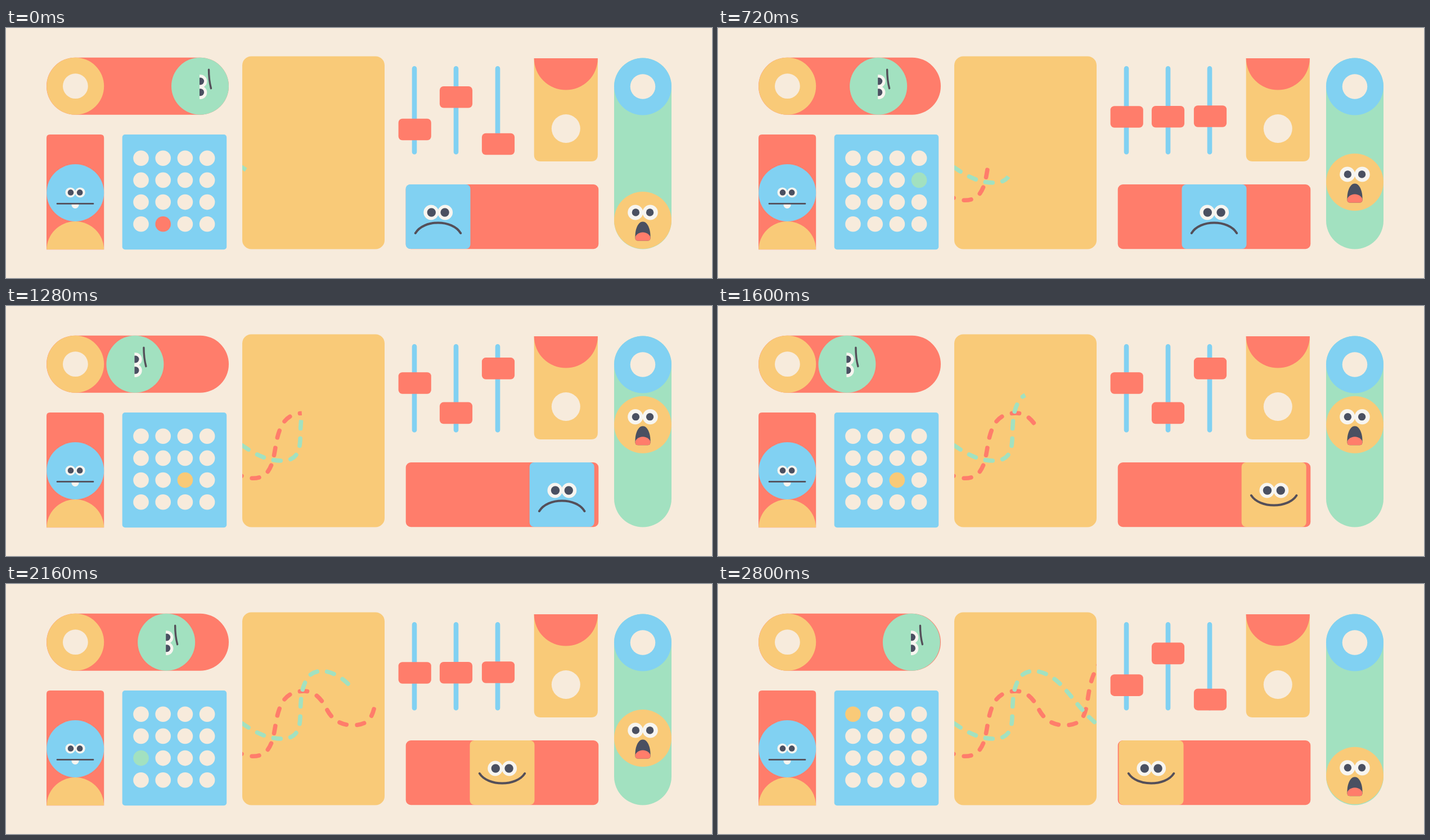
Write an HTML page that moves like this. It is 1255 px wide and 446 px high and loops after 2880 ms.

```html
<!DOCTYPE html>
<html lang="en">
<head>
<meta charset="utf-8">
<title>Toy shapes</title>
<style>
  html, body { margin: 0; width: 100%; height: 100%; overflow: hidden; background: #f7ebdc; }
  svg { display: block; width: 1255px; height: 446px; }
  .bg { fill: #f7ebdc; }
  .coral { fill: #ff7d6b; }
  .gold { fill: #f9ca78; }
  .blue { fill: #81d1f2; }
  .mint { fill: #a2e1c0; }
  .white { fill: #f7f5f0; }
  .dark { fill: #4a5061; }
  .line { fill: none; stroke: #544f59; stroke-linecap: round; }
  .track { stroke: #81d1f2; stroke-width: 8.6; stroke-linecap: round; }
  .dash { fill: none; stroke-width: 7.6; stroke-linecap: round; }
  .reveal { fill: none; stroke: #fff; stroke-width: 20; }
</style>
</head>
<body>
<svg viewBox="0 0 1255 446">
  <defs>
    <path id="mintPath" d="M410,242 C430,255 455,276 490,276 C515,276 522,262 523,238 C524,205 524,180 541,162 C556,150 580,155 600,171 C622,188 645,228 674,250 l10,7"/>
    <path id="coralPath" d="M410,299 C428,309 452,312 465,296 C481,275 476,239 490,214 C498,197 513,191 530,191 C548,191 560,204 569,221 C579,242 594,252 618,252 C640,251 650,243 655,219 C660,190 661,172 674,148 l6,-10"/>
    <mask id="mintMask" maskUnits="userSpaceOnUse" x="400" y="40" width="290" height="360">
      <use id="mintReveal" class="reveal" href="#mintPath"/>
    </mask>
    <mask id="coralMask" maskUnits="userSpaceOnUse" x="400" y="40" width="290" height="360">
      <use id="coralReveal" class="reveal" href="#coralPath"/>
    </mask>
    <clipPath id="card"><rect x="420" y="50.5" width="253" height="344" rx="16"/></clipPath>
    <clipPath id="lid"><rect x="-1" y="-30" width="30" height="60"/></clipPath>
    <clipPath id="tall"><rect x="72" y="190" width="102" height="205"/></clipPath>
    <path id="mouth" d="M-13.5,28 C-13.5,16 -8.5,2.5 0,2.5 C8.5,2.5 13.5,16 13.5,28 V31.5 q0,5 -5,5 h-17 q-5,0 -5,-5z"/>
    <clipPath id="mouthClip"><use href="#mouth"/></clipPath>
    <g id="squareEyes">
      <circle class="white" cx="45.2" cy="50" r="13.4"/><circle class="white" cx="70.2" cy="50" r="13.4"/>
      <circle class="dark" cx="45.8" cy="50" r="7.7"/><circle class="dark" cx="69.6" cy="50" r="7.7"/>
    </g>
  </defs>

  <!-- Horizontal pill -->
  <rect class="coral" x="72" y="52.7" width="324" height="102" rx="51"/>
  <circle class="gold" cx="123.2" cy="103.7" r="51"/>
  <circle class="bg" cx="123.4" cy="103.7" r="22.4"/>
  <g id="mintBall">
    <circle class="mint" r="51"/>
    <g clip-path="url(#lid)">
      <circle class="white" cx=".5" cy="-8.7" r="11.8"/><circle class="white" cx=".5" cy="11.4" r="11.8"/>
      <circle class="dark" cx=".6" cy="-8.7" r="6.5"/><circle class="dark" cx=".6" cy="11" r="6.5"/>
    </g>
    <path class="line" stroke-width="3.4" d="M15.5,-29.5 Q15.5,-11 19.5,4"/>
  </g>

  <!-- Tall box -->
  <path class="coral" d="M72,395.3 V196 q0,-6 6,-6 h90.2 q6,0 6,6 V395.3z"/>
  <circle class="blue" cx="123.2" cy="294" r="51"/>
  <circle class="gold" cx="123.2" cy="396" r="51" clip-path="url(#tall)"/>
  <circle class="white" cx="114.5" cy="293.4" r="9"/><circle class="white" cx="131.7" cy="293.4" r="9"/>
  <circle class="dark" cx="115" cy="293.4" r="5.3"/><circle class="dark" cx="131.2" cy="293.4" r="5.3"/>
  <path class="white" d="M116.5,314 h13 v1.5 a6.5,6.5 0 0 1 -13,0z"/>
  <path class="line" stroke-width="2.6" d="M91,313.4 H155"/>

  <!-- Dot board -->
  <rect class="blue" x="206.7" y="190" width="185.5" height="205.3" rx="5"/>
  <g id="dots"></g>

  <!-- Dashed lines -->
  <rect class="gold" x="420" y="50.5" width="253" height="344" rx="16"/>
  <g clip-path="url(#card)">
    <g mask="url(#coralMask)">
      <use class="dash" href="#coralPath" stroke="#ff7d6b" stroke-dasharray="13 18.8" stroke-dashoffset="-28.5"/>
    </g>
    <g mask="url(#mintMask)">
      <use class="dash" href="#mintPath" stroke="#a2e1c0" stroke-dasharray="13 17.6" stroke-dashoffset="-12.5"/>
    </g>
  </g>

  <!-- Sliders -->
  <path class="track" d="M726,72.3 V221.3 M800,72.3 V221.3 M874,72.3 V221.3"/>
  <g id="knobs"></g>

  <!-- Tag -->
  <path class="gold" d="M938.7,54 h113.2 v172 q0,12 -12,12 h-89.2 q-12,0 -12,-12z"/>
  <path class="coral" d="M938.7,54 h113.2 a56.6,56.6 0 0 1 -113.2,0z"/>
  <circle class="bg" cx="995.3" cy="179.5" r="25.5"/>

  <!-- Bar with sliding square -->
  <rect class="coral" x="710.7" y="279" width="342.6" height="115.2" rx="9"/>
  <g id="sad">
    <rect class="blue" width="115" height="115" rx="8"/>
    <use href="#squareEyes"/>
    <path class="line" stroke-width="4" d="M17.3,87 C32,62.3 83,62.3 97.7,87"/>
  </g>
  <g id="glad">
    <rect class="gold" width="115" height="115" rx="8"/>
    <use href="#squareEyes"/>
    <path class="line" stroke-width="4" d="M17.3,59 C32,82.3 83,82.3 97.7,59"/>
  </g>

  <!-- Vertical pill -->
  <rect class="mint" x="1081" y="53.5" width="102" height="341" rx="51"/>
  <circle class="blue" cx="1132" cy="104.5" r="51"/>
  <circle class="bg" cx="1132" cy="104.5" r="22.3"/>
  <g id="goldBall">
    <circle class="gold" r="51"/>
    <circle class="white" cx="-13.2" cy="-14" r="13.6"/><circle class="white" cx="13.2" cy="-14" r="13.6"/>
    <circle class="dark" cx="-12.6" cy="-14" r="6.7"/><circle class="dark" cx="12.6" cy="-14" r="6.7"/>
    <use class="dark" href="#mouth"/>
    <ellipse class="coral" cy="33.5" rx="14" ry="12" clip-path="url(#mouthClip)"/>
  </g>
</svg>
<script>
const LOOP = 2880, HALF = LOOP / 2, STEP = 80;
const $ = id => document.getElementById(id);

function add(parent, tag, attrs) {
  const el = document.createElementNS('http://www.w3.org/2000/svg', tag);
  for (const k in attrs) el.setAttribute(k, attrs[k]);
  return parent.appendChild(el);
}

const dots = [];
for (let i = 0; i < 16; i++) {
  dots.push(add($('dots'), 'circle', {
    cx: 240 + (i % 4) * 39.2, cy: 232.2 + Math.floor(i / 4) * 39.2, r: 13.8
  }));
}
// Lit dot and its colour, in equal shares of the loop
const lights = [[13, 'coral'], [7, 'mint'], [10, 'gold'], [8, 'mint'], [0, 'gold']];

// left edge, centre at the start, centre at the far end
const knobs = [[697.6, 181, 136], [770.9, 123.3, 193.3], [845.9, 207, 108]].map(([x, from, to]) => ({
  el: add($('knobs'), 'rect', { class: 'coral', x, width: 58.2, height: 38.6, rx: 7 }), from, to
}));

// Time and revealed length of each dashed line
const mintSteps = [[0, 20], [320, 75], [720, 118], [1040, 142], [1600, 232], [2160, 307], [2800, 410]];
const coralSteps = [[0, 7], [320, 55], [720, 114], [1040, 157], [1600, 236], [2160, 372], [2800, 450]];

const mix = (a, b, p) => a + (b - a) * p;
const ease = p => p * p * (3 - 2 * p);

function lookup(steps, t) {
  const i = steps.findIndex(s => s[0] > t);
  if (i < 0) return steps[steps.length - 1][1];
  const [t0, a] = steps[i - 1], [t1, b] = steps[i];
  return mix(a, b, (t - t0) / (t1 - t0));
}

function move(id, x, y) {
  $(id).setAttribute('transform', `translate(${x} ${y})`);
}

function draw(t) {
  const p = ease(t < HALF ? t / HALF : 2 - t / HALF);
  move('mintBall', mix(345, 225.3, p), 103.7);
  move('goldBall', 1132, mix(343, 207, p));
  for (const k of knobs) k.el.setAttribute('y', mix(k.from, k.to, p) - 19.3);

  const x = mix(710.5, 938.5, p);
  move('sad', x, 279);
  move('glad', x, 279);
  $('sad').style.display = t < HALF ? '' : 'none';
  $('glad').style.display = t < HALF ? 'none' : '';

  const [lit, colour] = lights[Math.floor(t * lights.length / LOOP)];
  dots.forEach((d, i) => d.setAttribute('class', i === lit ? colour : 'bg'));

  $('mintReveal').setAttribute('stroke-dasharray', lookup(mintSteps, t) + ' 999');
  $('coralReveal').setAttribute('stroke-dasharray', lookup(coralSteps, t) + ' 999');
}

// The motion advances in steps; the small lead absorbs timer rounding
function tick(now) {
  draw(Math.floor((now + 4) / STEP) * STEP % LOOP);
  requestAnimationFrame(tick);
}
draw(0);
requestAnimationFrame(tick);
</script>
</body>
</html>
```
